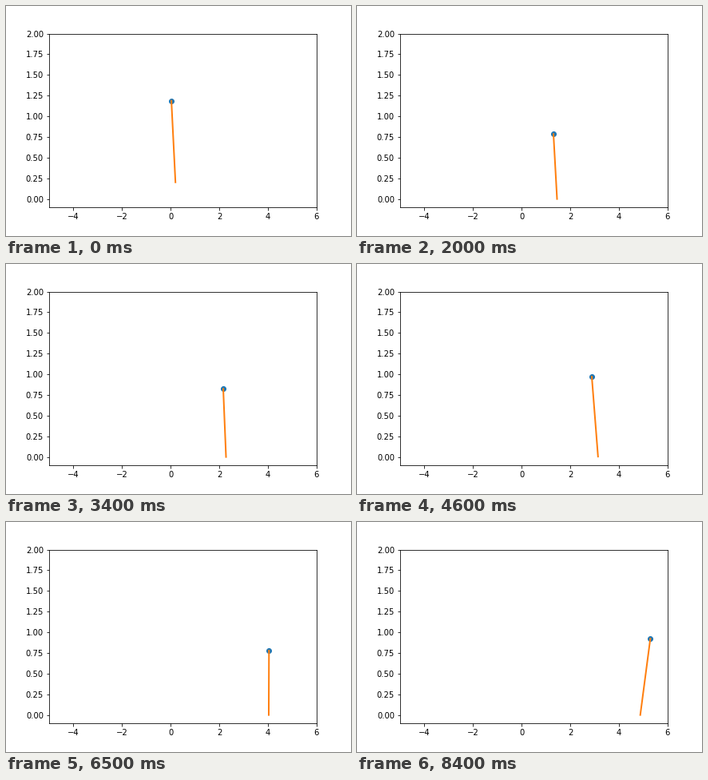
Recreate the animation shown at these times as a matplotlib script. Size 432 px wide and 288 px high, loop 8500 ms.

```python
import math
import numpy as np
import matplotlib.pyplot as plt
from matplotlib.animation import FuncAnimation

FRAMES, STEP_MS = 85, 100
G = 9.81 * 0.05 ** 2            # gravity per frame squared
FIRST, PERIOD, STANCE = 3.2, 14.3, 9.4
FLIGHT = PERIOD - STANCE

# Key points of the forward travel, and where the foot is planted
TRAVEL_T = [0, FIRST, 13, 27, 34, 46, 65, 84]
TRAVEL_X = [0.03, 0.16, 0.865, 1.752, 2.163, 2.885, 4.045, 5.294]
FEET = [0.327, 1.456, 2.278, 3.148, 4.035, 4.88]


def travel(t):
    return np.interp(t, TRAVEL_T, TRAVEL_X)


def landing(i):
    """Leg vector at touchdown; the leg then has length one."""
    lead = FEET[i] - travel(FIRST + i * PERIOD)
    return lead, math.sqrt(1 - lead ** 2)


def takeoff(i):
    """Leg vector when the foot leaves the ground."""
    lead = FEET[i] - travel(FIRST + i * PERIOD + STANCE)
    return lead, 0.92 + 0.07 * 0.65 ** i


def pose(t):
    x = travel(t)
    if t < FIRST:
        lead, height = landing(0)
        y = 1.2 - G * (t + 1) ** 2 / 2
        return x, y, x + lead, y - height

    i, s = divmod(t - FIRST, PERIOD)
    i = int(i)
    if s <= STANCE:
        u = s / STANCE
        squash = (0.25 - 0.02 * i) * math.sin(math.pi * u)
        y = (1 - u) * landing(i)[1] + u * takeoff(i)[1] - squash
        return x, y, FEET[i], 0.0

    u = (s - STANCE) / FLIGHT
    off, land = takeoff(i), landing(i + 1)
    rise = 0.075 - 0.003 * i ** 2
    y = (1 - u) * off[1] + u * land[1] + 4 * rise * u * (1 - u)
    # the leg swings forward at the apex
    lead, height = off if u < 0.5 else land
    return x, y, x + lead, y - height


plt.rcParams["font.family"] = "DejaVu Sans"
fig = plt.figure(figsize=(6, 4), dpi=72, facecolor="white")
fig.subplots_adjust(left=0.125, right=0.9, bottom=0.125, top=0.88)
ax = fig.add_subplot()
ax.set_xlim(-5, 6)
ax.set_ylim(-0.1, 2.0)
ax.set_xticks(np.arange(-4, 7, 2))
ax.set_yticks(np.arange(0, 2.01, 0.25))
ax.tick_params(axis="y", pad=3.52)
body, = ax.plot([], [], "o", color="C0", markersize=6)
leg, = ax.plot([], [], color="C1", lw=2)


def draw(frame):
    x, y, foot_x, foot_y = pose(frame)
    body.set_data([x], [y])
    leg.set_data([x, foot_x], [y, foot_y])
    return body, leg


anim = FuncAnimation(fig, draw, frames=FRAMES, interval=STEP_MS,
                     repeat=True, repeat_delay=0)
plt.show()
```
